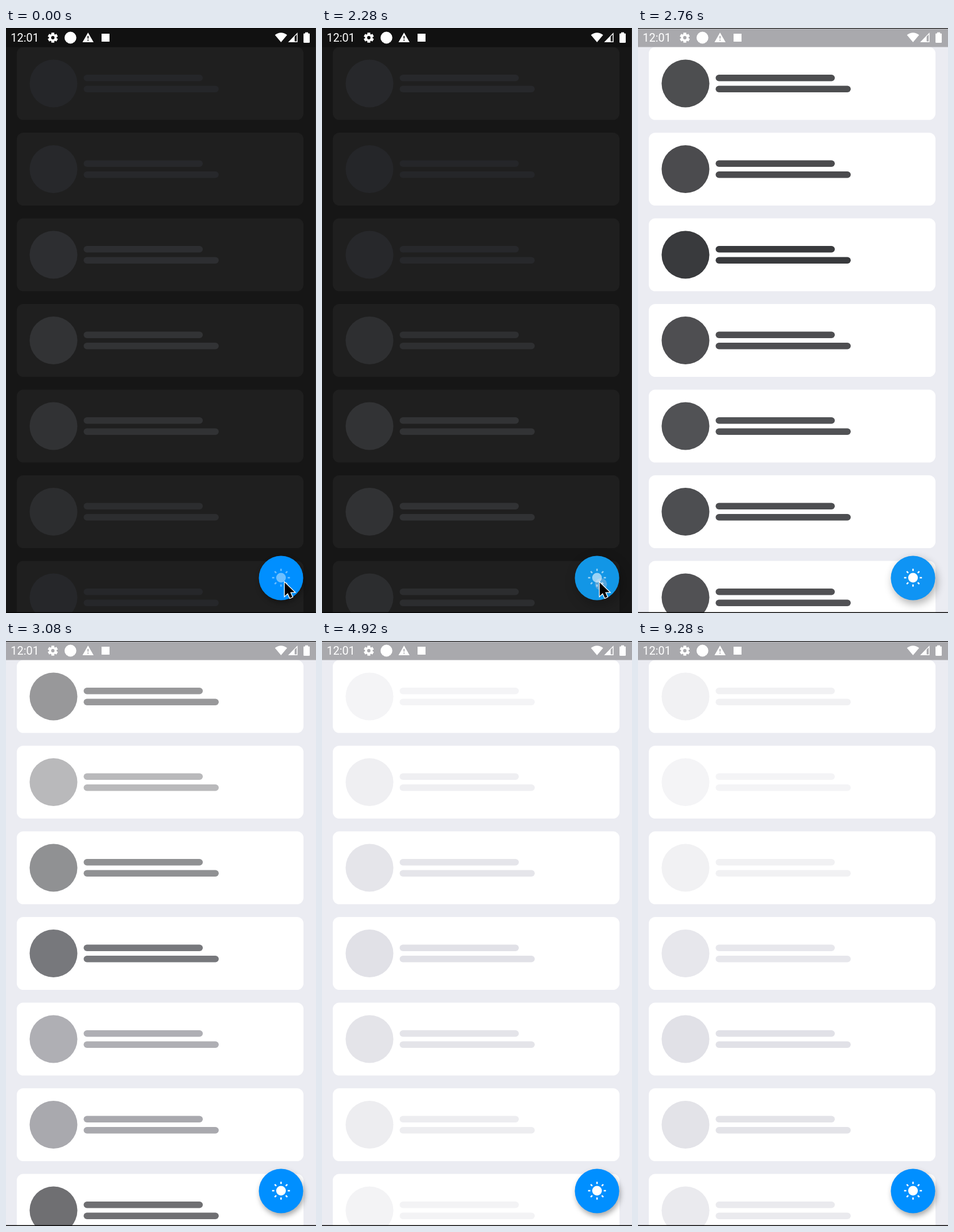
Recreate the animation shown at these times as an HTML page with a canvas. Size 545 by 1028 pixels, loop 9400 ms.

```html
<!DOCTYPE html>
<html lang="en">
<head>
<meta charset="utf-8">
<title>Skeleton list</title>
<style>
  html, body { margin: 0; width: 100%; height: 100%; overflow: hidden; background: #161616; }
  canvas { display: block; width: 545px; height: 1028px; }
</style>
</head>
<body>
<canvas id="stage" width="545" height="1028"></canvas>
<script>
const ctx = document.getElementById('stage').getContext('2d');
const W = 545, H = 1028, LOOP = 9400, TAU = Math.PI * 2;
const ROWS = 7, PITCH = 150.5, HALF = 1000, STAGGER = 300, LEAD = 20;
const SWITCH = 2320, SWITCH_LAG = 140, CURSOR_GONE = 2700;
const FAB = { x: 483.5, y: 966.5, r: 39 };

const DARK = { bg: '#161616', bar: '#111111', card: '#1f1f1f', pulse: [[37, 38, 41], [50, 51, 53]] };
const LIGHT = { bg: '#ebecf2', bar: '#a9a9ad', card: '#ffffff', pulse: [[225, 225, 231], [244, 244, 246]] };

const clamp = (v) => Math.min(1, Math.max(0, v));
const ramp = (t, from, to) => clamp((t - from) / (to - from));
const ease = (p) => p < 0.5 ? 2 * p * p : 1 - 2 * (1 - p) * (1 - p);
const mix = (a, b, p) => a.map((v, i) => v + (b[i] - v) * p);
const rgb = (c) => `rgb(${c.map(Math.round).join(',')})`;

// Each row alternates between two shades; a theme switch retargets the running half cycle.
function pulseColor(row, t) {
  const phase = (time) => time + LEAD - row * STAGGER;
  const half = (time) => Math.floor(phase(time) / HALF);
  const target = (theme, n) => theme.pulse[n & 1 ? 0 : 1];
  const steady = (theme, time) => {
    const n = half(time);
    return mix(target(theme, n - 1), target(theme, n), ease(phase(time) / HALF - n));
  };
  if (t < SWITCH) return steady(DARK, t);

  const first = half(SWITCH), n = half(t);
  const retarget = (time) => mix(
    steady(DARK, SWITCH), target(LIGHT, first),
    ease(ramp(time, SWITCH + SWITCH_LAG, SWITCH + SWITCH_LAG + HALF)));
  if (n === first) return retarget(t);
  if (n > first + 1) return steady(LIGHT, t);
  const flip = n * HALF - LEAD + row * STAGGER;
  return mix(retarget(flip), target(LIGHT, n), ease((t - flip) / HALF));
}

function disc(x, y, r, color) {
  ctx.fillStyle = color;
  ctx.beginPath();
  ctx.arc(x, y, r, 0, TAU);
  ctx.fill();
}

function pill(x, y, w, h, r, color) {
  ctx.fillStyle = color;
  ctx.beginPath();
  ctx.roundRect(x, y, w, h, r);
  ctx.fill();
}

function poly(points, color) {
  ctx.fillStyle = color;
  ctx.beginPath();
  points.forEach(([x, y]) => ctx.lineTo(x, y));
  ctx.closePath();
  ctx.fill();
}

function drawRow(row, theme, t) {
  const y = 33.5 + row * PITCH, color = rgb(pulseColor(row, t));
  pill(19, y, 504, 128, 11.5, theme.card);
  disc(83.5, y + 64, 42, color);
  pill(136.5, y + 48.5, 209.5, 11.5, 5.75, color);
  pill(136.5, y + 68, 237.5, 11.5, 5.75, color);
}

function drawGear(x, y, hole) {
  ctx.save();
  ctx.translate(x, y);
  ctx.fillStyle = '#fff';
  for (let i = 0; i < 6; i++) {
    ctx.fillRect(-2.6, -8.8, 5.2, 6);
    ctx.rotate(TAU / 6);
  }
  ctx.restore();
  disc(x, y, 6.7, '#fff');
  disc(x, y, 3, hole);
}

function drawStatusBar(theme) {
  ctx.fillStyle = theme.bar;
  ctx.fillRect(0, 0, W, 33.5);
  ctx.fillStyle = '#fff';
  ctx.font = '20px Roboto, sans-serif';
  ctx.textBaseline = 'alphabetic';
  ctx.fillText('12:01', 8.3, 24);

  drawGear(82.3, 17, theme.bar);
  disc(113.3, 17, 10.4, '#fff');
  poly([[144.2, 8], [154, 25], [134.5, 25]], '#fff');
  ctx.fillStyle = theme.bar;
  ctx.fillRect(143.3, 14, 1.9, 4.6);
  ctx.fillRect(143.3, 20.4, 1.9, 2);
  pill(168, 10, 14, 14, 0, '#fff');

  ctx.fillStyle = '#fff';
  ctx.beginPath();
  ctx.moveTo(483.5, 25);
  ctx.lineTo(472.8, 12.2);
  ctx.quadraticCurveTo(483.5, 4.4, 494.2, 12.2);
  ctx.fill();

  poly([[512.5, 8], [512.5, 25], [496, 25]], '#fff');
  poly([[511, 11.5], [511, 23.5], [507.5, 23.5], [507.5, 15]], theme.bar);
  pill(523, 9.5, 11, 16.5, 1.3, '#fff');
  ctx.fillRect(526, 7.6, 5, 3);
}

function drawSun(alpha) {
  ctx.save();
  ctx.translate(FAB.x, 966);
  ctx.globalAlpha = alpha;
  disc(0, 0, 8.5, '#fff');
  for (let i = 0; i < 8; i++) {
    ctx.fillRect(-1.25, -15.7, 2.5, 3.9);
    ctx.rotate(TAU / 8);
  }
  ctx.restore();
}

function drawButton(t) {
  const press = ramp(t, 2080, 2200) * (1 - ramp(t, 2560, 2880));
  ctx.save();
  ctx.shadowColor = `rgba(0,0,0,${0.34 - 0.06 * press})`;
  ctx.shadowBlur = 10 + 12 * press;
  ctx.shadowOffsetX = 2 + 3 * press;
  ctx.shadowOffsetY = 5 + 3 * press;
  disc(FAB.x, FAB.y, FAB.r, rgb(mix([0, 143, 255], [18, 150, 230], press)));
  ctx.restore();

  const radius = Math.max(0, 10 + (t - 2280) * 0.6);
  const fade = 1 - ramp(t, 2400, 2800);
  if (t > 2260 && fade > 0) {
    ctx.save();
    ctx.beginPath();
    ctx.arc(FAB.x, FAB.y, FAB.r, 0, TAU);
    ctx.clip();
    ctx.globalAlpha = fade;
    disc(490.5, 977.5, Math.min(radius, 84), 'rgba(190,190,205,.4)');
    ctx.restore();
  }
  drawSun(t < SWITCH ? 0.43 + 0.15 * ramp(t, 2080, 2280) : 1);
}

function drawCursor(t) {
  if (t >= CURSOR_GONE) return;
  ctx.save();
  ctx.translate(t < 2080 ? 490 : 488.2, 974.5);
  ctx.beginPath();
  [[0, 0], [0, 23.5], [5.4, 18.6], [9.2, 27], [13.4, 25.2], [9.7, 17], [17.2, 16.8]]
    .forEach(([x, y]) => ctx.lineTo(x, y));
  ctx.closePath();
  ctx.lineJoin = 'miter';
  ctx.lineWidth = 2.6;
  ctx.strokeStyle = '#fff';
  ctx.stroke();
  ctx.fillStyle = '#000';
  ctx.fill();
  ctx.restore();
}

function draw(t) {
  const theme = t < SWITCH ? DARK : LIGHT;
  ctx.fillStyle = theme.bg;
  ctx.fillRect(0, 0, W, H);
  for (let row = 0; row < ROWS; row++) drawRow(row, theme, t);
  drawStatusBar(theme);
  drawButton(t);
  if (theme === DARK) {
    ctx.fillStyle = '#2a2a2a';
    ctx.fillRect(W - 1, 0, 1, H);
  }
  ctx.fillStyle = '#050505';
  ctx.fillRect(0, 0, W, 1);
  ctx.fillRect(0, H - 1.5, W, 1.5);
  drawCursor(t);
}

const start = performance.now();
function tick() {
  draw((performance.now() - start) % LOOP);
  requestAnimationFrame(tick);
}
tick();
</script>
</body>
</html>
```
